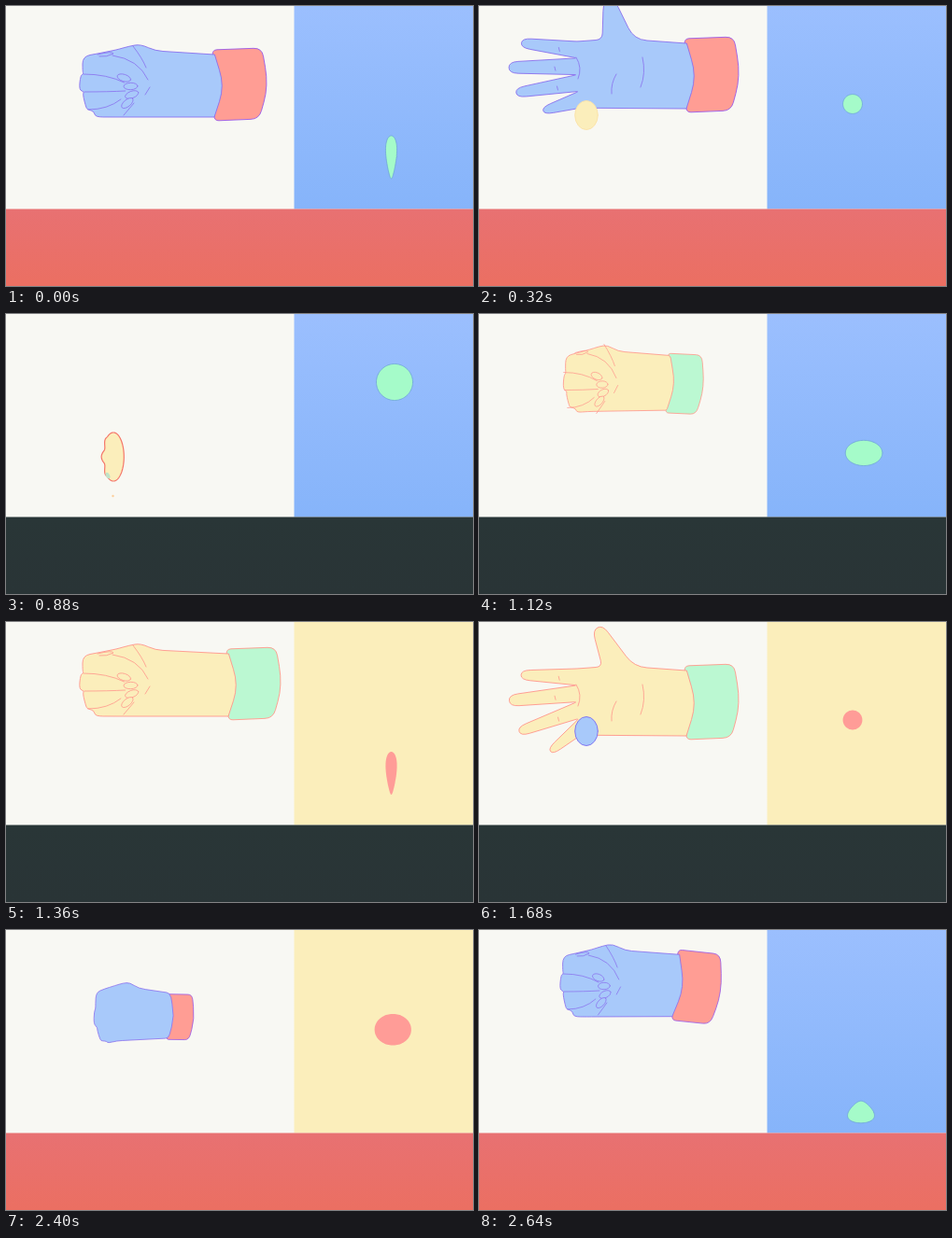
Animation of 500 by 300 pixels, one loop 2720 ms. Source, as an HTML page with a canvas:

```html
<!DOCTYPE html>
<html lang="en">
<head>
<meta charset="utf-8">
<title>Bouncing hands</title>
<style>
html, body { margin: 0; width: 100%; height: 100%; overflow: hidden; background: #f8f8f3; }
canvas { display: block; }
</style>
</head>
<body>
<canvas id="stage" width="500" height="300"></canvas>
<script>
const ctx = document.getElementById('stage').getContext('2d');
const STEP = 80, HALF = 17, COUNT = HALF * 2, TAU = Math.PI * 2;
const FLOOR = 217.5, WALL = 308.5;

const lerp = (a, b, k) => a + (b - a) * k;
const mix = (a, b, k) => a.map((v, i) => Array.isArray(v) ? mix(v, b[i], k) : lerp(v, b[i], k));
const easeOut = k => 1 - (1 - k) ** 2;
const easeIn = k => k * k;
const smoothstep = k => k * k * (3 - 2 * k);
const range = (n, make) => Array.from({ length: n }, (_, i) => make(i));

// Closed polygon of [x, y, softness]; each corner is cut back and curved.
function softPoly(pts) {
  const path = new Path2D(), n = pts.length;
  const cut = ([x, y, r], [u, v]) => {
    const k = Math.min(.5, r / (Math.hypot(u - x, v - y) || 1));
    return [lerp(x, u, k), lerp(y, v, k)];
  };
  pts.forEach((p, i) => {
    path.lineTo(...cut(p, pts[(i + n - 1) % n]));
    path.quadraticCurveTo(p[0], p[1], ...cut(p, pts[(i + 1) % n]));
  });
  path.closePath();
  return path;
}

function paint(path, fill, line, width = .9) {
  ctx.fillStyle = fill;
  ctx.fill(path);
  if (!line) return;
  ctx.strokeStyle = line;
  ctx.lineWidth = width;
  ctx.stroke(path);
}

function oval(x, y, rx, ry, turn = 0) {
  const path = new Path2D();
  path.ellipse(x, y, rx, ry, turn, 0, TAU);
  return path;
}

// Round shape whose radius and width may vary with the angle.
function round(x, y, rx, ry, swell = () => 1, tail = 0) {
  const path = new Path2D();
  for (let a = 0; a < TAU; a += TAU / 90) {
    const r = swell(a);
    path.lineTo(x + rx * r * Math.cos(a) * (1 - tail * Math.sin(a)), y + ry * r * Math.sin(a));
  }
  path.closePath();
  return path;
}

function shade(x, y, w, h, top, bottom = top) {
  const g = ctx.createLinearGradient(0, y, 0, y + h);
  g.addColorStop(0, top);
  g.addColorStop(1, bottom);
  ctx.fillStyle = g;
  ctx.fillRect(x, y, w, h);
  return g;
}

function fistPose(x, dy) {
  const shift = ([u, v]) => [u, v + dy];
  return {
    x, top: 52 + dy, bottom: 119 + dy, soft: 8,
    thumb: [[160, 48], [118, 47], [138, 42]].map(shift), thumbWidth: 6,
    webs: [[98, 51], [83, 73], [84, 92], [88, 111], [112, 119]].map(shift),
    tips: [[82, 62], [79, 82], [84, 102], [95, 116]].map(shift),
    widths: [8, 8, 8, 3]
  };
}

function openPose(top, thumbX, angle, spread, bend) {
  const webs = range(5, i => [105 + 2 * Math.max(0, i - 2), top - 2 + 17.8 * i]);
  const tips = [60, 73, 67, 41].map((reach, i) => {
    const a = (angle + spread * i + bend * i * i) * TAU / 360;
    return [lerp(webs[i][0], webs[i + 1][0], .5) - reach * Math.cos(a),
      lerp(webs[i][1], webs[i + 1][1], .5) + reach * Math.sin(a)];
  });
  return {
    x: 222, top, bottom: top + 70, soft: 14, webs, tips, widths: [5, 6, 5, 4],
    thumb: [[166, top - 4], [132, top - 4], [thumbX, top - 46]], thumbWidth: 6
  };
}

// The two outer corners of a digit that stands on a and b.
function digit(a, b, tip, width) {
  const dx = tip[0] - (a[0] + b[0]) / 2, dy = tip[1] - (a[1] + b[1]) / 2, d = Math.hypot(dx, dy);
  return [1, -1].map(s => [tip[0] - s * width * dy / d, tip[1] + s * width * dx / d, 10]);
}

function outlineOf({ x, top, bottom, soft, thumb, thumbWidth, webs, tips, widths }) {
  const [right, left] = thumb;
  return [
    [x, top, 0], [...right, soft], ...digit(...thumb, thumbWidth), [...left, soft / 2],
    ...tips.flatMap((tip, i) => [[...webs[i], 3], ...digit(webs[i], webs[i + 1], tip, widths[i])]),
    [...webs[4], 6], [x, bottom, 0], [x + 11, (top + bottom) / 2, 40]
  ];
}

const cuffOf = ({ x, top, bottom }) => [
  [x - 2, top - 5, 5], [x + 51, top - 7, 9], [x + 58, (top + bottom) / 2, 30],
  [x + 48, bottom + 2, 9], [x, bottom + 4, 5]
];

const HANDS = [
  { skin: '#a8c9fa', line: '#8a70ee', cuff: '#ff9d94', cuffLine: '#9a5be8', ball: '#7d6cf0',
    rise: 0, fist: fistPose(223, 0), open: openPose(40, 139, -7, 8, 0) },
  { skin: '#fbeebb', line: '#ff968c', cuff: '#bbf8d2', cuffLine: '#ff9a8c', ball: '#fbe3a8',
    rise: -18, fist: fistPose(238, -18), open: openPose(52, 127, -2, 5, 3) }
];
const THUMB_FOLDS = new Path2D('M98 52Q114 48 115 51Q108 55 100 54M114 53Q142 57 152 79M136 43Q146 56 150 66M154 87L149 95M126 117L137 104');
const PALM_LINES = new Path2D('M147 33Q141 43 142 54M175 15Q179 32 173 47M104 15Q111 26 106 38');

function drawFolds({ skin, line, fist, rise }) {
  ctx.lineWidth = .8;
  for (let i = 0; i < 4; i++) {
    const x = 135 - 3 * (i - 1.7) ** 2, y = 77 + 9 * i + rise, [u, v] = fist.webs[i];
    if (i) ctx.stroke(new Path2D(`M${u} ${v}Q${(u + x) / 2} ${v} ${x - 7} ${y - 4}`));
    paint(oval(x, y, 7.5, 3.7, .3 - .33 * i), skin, line, .8);
  }
  ctx.translate(0, rise);
  ctx.stroke(THUMB_FOLDS);
}

function drawPalm({ open: { top, webs, tips } }) {
  ctx.lineWidth = .8;
  for (let i = 0; i < 3; i++) {
    const [x, y] = mix(webs[i], tips[i], .33);
    ctx.stroke(new Path2D(`M${x} ${y + 6}l1 4`));
  }
  ctx.translate(0, top);
  ctx.stroke(PALM_LINES);
}

function drawHand(hand, open, grown = 1, lean = 0) {
  const { fist } = hand, midY = (fist.top + fist.bottom) / 2 - 3;
  let outline = mix(outlineOf(fist), outlineOf(hand.open), open);
  let cuff = mix(cuffOf(fist), cuffOf(hand.open), open);

  if (lean) {
    const c = Math.cos(lean), s = Math.sin(lean);
    const bend = ([x, y, r]) => [fist.x + (x - fist.x) * c - (y - midY) * s, midY + (x - fist.x) * s + (y - midY) * c, r];
    cuff = cuff.map(bend);
    outline = outline.map(p => p[0] >= fist.x ? bend(p) : p);
  }
  if (grown < 1) {
    const n = outline.length;
    const seed = range(n, i => {
      const a = -.5 - i / n * TAU;
      return [115 + 14 * Math.cos(a), midY + 26 * Math.sin(a), 12];
    });
    outline = mix(seed, outline, grown);
    cuff = mix(cuff.map(() => [120, midY, 0]), cuff, grown);
  }
  paint(softPoly(cuff), hand.cuff, hand.cuffLine);
  paint(softPoly(outline), hand.skin, hand.line);
  if (open > .7) drawPalm(hand);
  if (open < .3 && grown > .8) drawFolds(hand);
}

function placeHand(h, turn) {
  ctx.save();
  if (h < 9) {
    ctx.translate(18 * Math.max(0, h - 4) ** 2, 0);
    drawHand(HANDS[turn], smoothstep(Math.min(1, h / 4)));
  } else if (h > 11) {
    const hand = HANDS[1 - turn], k = (h - 11) / 5, up = easeOut(k);
    ctx.translate(115 + 3 * k, lerp(153, 56, up));
    ctx.scale(.75 + .11 * k, 1);
    ctx.translate(-115, -82 - hand.rise);
    drawHand(hand, 0, up, .13 * k);
  }
  ctx.restore();
}

function drawBall(h, { skin, ball }) {
  if (h === 3) paint(oval(115, 111, 10, 11), skin, ball);
  else if (h > 3 && h < 10) {
    const k = easeIn((h - 4) / 5);
    paint(oval(115 + k * .7, 117 + 55 * k, 12.3 - 4 * k, 15.5 + 4.7 * k, -.05 * k), skin, ball);
  } else if (h === 10) paint(oval(115, 209, 20, 8), skin, ball);
  else if (h === 11) {
    // Knuckles start to show on the left side.
    const knuckles = a => 1 + .28 * Math.cos(8 * a) * Math.max(0, -Math.cos(a) - .5);
    paint(round(115, 153, 11.3, 26, knuckles), skin, skin === HANDS[1].skin ? '#f5776a' : ball, 1.2);
    paint(oval(109, 173, 2, 3.5, -.5), '#bfe3c8');
    paint(oval(114.5, 195, 1.2, 1.2), '#fbcf9c');
  }
}

// Blob keys: step, [x, y, rx, ry, tail], easing towards the key.
const BLOB = [
  [0, [412.5, 162, 5.6, 23, .45]],
  [4, [400, 105, 10.4, 10.4, 0], easeOut],
  [9, [413.5, 85.5, 20.5, 21, 0], k => k],
  [11, [416, 73, 19.5, 19.5, 0], k => k],
  [15, [409, 208, 20, 9, 0], easeIn],
  [16, [409, 195, 13.5, 11.8, -.4], k => k]
];

function drawBlob(h, cool, back) {
  const i = Math.max(1, BLOB.findIndex(key => key[0] >= h));
  const [start, from] = BLOB[i - 1], [end, to, ease] = BLOB[i];
  const [x, y, rx, ry, tail] = mix(from, to, ease((h - start) / (end - start)));
  paint(round(x, y, rx, ry, undefined, tail), cool ? '#a5fbc9' : '#ff9c97', cool && '#6fa4d8', .8);
  if (h === 8 || h === 9) {
    paint(oval(x - 17.5, y + 2.5, 6.5, 6), back);
    paint(oval(x - 10, y + 2, 3.5, 2.5), back);
  }
}

function draw(f) {
  const h = f % HALF, turn = f < HALF ? 0 : 1;
  ctx.lineJoin = ctx.lineCap = 'round';
  ctx.fillStyle = '#f8f8f3';
  ctx.fillRect(0, 0, 500, 300);
  placeHand(h, turn);
  drawBall(h, HANDS[1 - turn]);

  const cool = f < 15 || f >= HALF + 15, warm = f < 10 || f >= HALF + 10;
  const wall = cool ? ['#9bbffe', '#86b4fa'] : ['#fbeebb'];
  const back = shade(WALL, 0, 500 - WALL, FLOOR, ...wall);
  drawBlob(h, cool, back);
  shade(0, FLOOR, 500, 300 - FLOOR, ...(warm ? ['#e87172', '#eb6f62'] : ['#293637', '#293436']));
}

let shown = -1;
function tick() {
  const f = Math.floor(performance.now() / STEP) % COUNT;
  if (f !== shown) draw(shown = f);
  requestAnimationFrame(tick);
}
tick();
</script>
</body>
</html>
```
